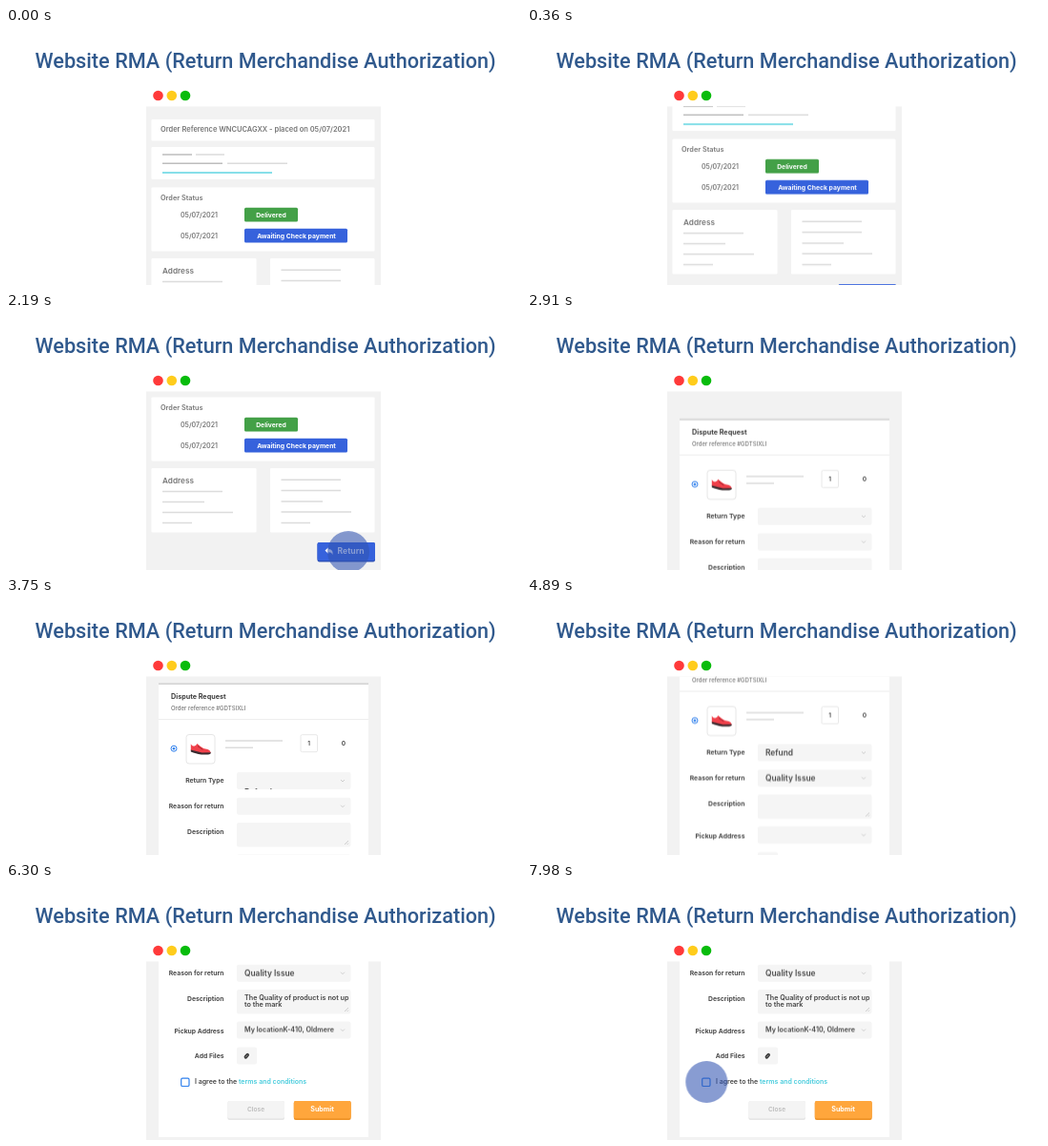
These frames come from a looping animation (540x270 px, 8 s). An HTML page:

```html
<!DOCTYPE html>
<html lang="en">
<head>
<meta charset="utf-8">
<title>Website RMA</title>
<style>
  html, body { margin: 0; width: 100%; height: 100%; overflow: hidden; background: #fff; }
  svg { display: block; }
  text { font-family: Inter, sans-serif; font-weight: 600; font-size: 7px; fill: #777; }
  .title { font-family: Roboto, sans-serif; font-weight: 500; font-size: 21.7px; fill: #30598d; }
  .card { fill: #fff; }
  .line { stroke: #dcdcdc; stroke-width: 1.4; fill: none; }
  .dark { stroke: #bdbdbd; }
  .white { fill: #fff; font-weight: 700; font-size: 6.8px; }
  .label { font-weight: 700; font-size: 6.8px; fill: #4a4a4a; text-anchor: end; }
  .count { font-size: 6.5px; fill: #444; }
  .field { fill: #f5f5f5; }
  .value { font-size: 8.4px; fill: #484848; }
  .note { font-size: 7.2px; fill: #444; }
  .mid { text-anchor: middle; }
  .mark { fill: none; stroke: #c4c4c4; stroke-width: .8; }
  .tap { fill: rgb(50, 85, 178); fill-opacity: .58; }
</style>
</head>
<body>
<svg width="540" height="270" viewBox="0 0 540 270">
  <text class="title" x="30.5" y="42">Website RMA (Return Merchandise Authorization)</text>
  <circle cx="159.5" cy="71" r="5.3" fill="#ff3a3a"/>
  <circle cx="173.8" cy="71" r="5.3" fill="#ffcc1c"/>
  <circle cx="188" cy="71" r="5.3" fill="#08bc0c"/>

  <svg x="147" y="82.5" width="246" height="187.5" viewBox="147 82.5 246 187.5">
    <rect x="147" y="82" width="246" height="188" fill="#f2f2f2"/>

    <g id="order">
      <rect class="card" x="152.5" y="96" width="234" height="22.5" rx="1"/>
      <text x="162" y="109.2" style="font-size:7.48px">Order Reference WNCUCAGXX - placed on 05/07/2021</text>

      <rect class="card" x="152.5" y="125" width="234" height="34" rx="1"/>
      <path class="line dark" d="M164 133H195M164 142.3H227"/>
      <path class="line" d="M199 133H229M232 142.3H295"/>
      <path class="line" style="stroke:#5fd4e2" d="M164 152H279"/>

      <rect class="card" x="152.5" y="167.5" width="234" height="67" rx="1"/>
      <text x="162" y="181.2" style="font-size:7.3px">Order Status</text>
      <text x="183" y="198.7">05/07/2021</text>
      <text x="183" y="220.7">05/07/2021</text>
      <rect x="250" y="188.7" width="56" height="14.8" rx="1.5" fill="#43a047"/>
      <text class="white mid" x="278" y="198.7">Delivered</text>
      <rect x="250" y="210.7" width="108" height="14.8" rx="1.5" fill="#3662dc"/>
      <text class="white mid" x="304.5" y="220.7">Awaiting Check payment</text>

      <rect class="card" x="152.5" y="242" width="110" height="67.5" rx="1"/>
      <rect class="card" x="277" y="242" width="109.5" height="67.5" rx="1"/>
      <text x="164" y="257.5" style="font-size:8.2px">Address</text>
      <path class="line" d="M164 266.5H227M164 277.5H208M164 288.5H238M164 299.5H195"/>
      <path class="line" d="M288.5 254.2H351M288.5 265.5H351M288.5 277H332M288.5 288H362M288.5 299.5H319"/>

      <rect x="326.5" y="320" width="60.5" height="20.5" rx="2" fill="#2c50b8"/>
      <rect x="326.5" y="320" width="60.5" height="19" rx="2" fill="#3662dc"/>
      <path d="M334.5 328.6l3.6-3.3v2c3.4 0 5.2 1.8 4.2 5.6c-.6-2-1.8-2.7-4.2-2.7v1.9z" fill="#fff"/>
      <text class="white" x="347.5" y="332.4" style="font-size:8.6px">Return</text>
    </g>

    <g id="form">
      <rect class="card" x="160" y="90" width="220" height="301"/>
      <rect x="160" y="89.3" width="220" height="1.8" fill="#d6d6d6"/>
      <text x="173" y="106.4" style="font-size:7.2px;font-weight:700;fill:#3c3c3c">Dispute Request</text>
      <text x="173" y="118.4" style="font-size:6px;font-weight:500">Order reference #GDTSIXLI</text>
      <path d="M160 127.5H380" stroke="#eee"/>

      <circle cx="176" cy="158.2" r="3" fill="none" stroke="#2f80ed"/>
      <circle cx="176" cy="158.2" r="1.3" fill="#2f80ed"/>
      <rect x="189" y="143.5" width="30" height="30.5" rx="3" fill="#fff" stroke="#e6e6e6"/>
      <path d="M193.8 153.2c1.5 3 4.5 3.4 6.6-.2c2.6 2.2 4.6 4.2 7.4 5.3c3.6.6 6.4 1.4 7 4.4l-9 .6l-12-3.2z" fill="#f0404a"/>
      <path d="M193.8 159.6l11.8 2.9l9.2-.3c.2 1.4-1 2.2-3 2.2h-7c-4.200-.5-7.500-1.600-11-3z" fill="#3a2a2e"/>
      <path d="M201 155.500l2.600 2.200M203.800 157.300l2.400 2" stroke="#8d1f2b" stroke-width=".8"/>
      <path class="line" d="M230 150H290M230 157.2H259"/>
      <rect x="309" y="143.7" width="17.5" height="18" rx="1.5" fill="#fff" stroke="#e8e8e8"/>
      <text class="count mid" x="317.7" y="154.8">1</text>
      <text class="count mid" x="354" y="154.8">0</text>

      <text class="label" x="228.5" y="193.6">Return Type</text>
      <text class="label" x="228.5" y="220.5">Reason for return</text>
      <text class="label" x="228.5" y="247.5">Description</text>
      <text class="label" x="228.5" y="281.5">Pickup Address</text>
      <text class="label" x="228.5" y="308.2">Add Files</text>

      <rect class="field" x="242" y="183" width="119.5" height="18" rx="2"/>
      <rect class="field" x="242" y="209.7" width="119.5" height="18" rx="2"/>
      <rect class="field" x="242" y="236" width="119.5" height="25.5" rx="2"/>
      <rect class="field" x="242" y="269.5" width="119.5" height="18" rx="2"/>
      <rect class="field" x="242" y="296.5" width="21" height="18" rx="2"/>
      <path class="mark" d="M351 191l2 2l2-2M351 217.7l2 2l2-2M351 277.5l2 2l2-2M355 259l4-4M357.5 259l1.5-1.5"/>
      <g transform="translate(252.3 305.7) rotate(40)">
        <rect x="-1.8" y="-3.2" width="3.6" height="6.4" rx="1.8" fill="#3c3c3c"/>
        <path d="M0 -1.5V1.7" stroke="#aaa" stroke-width=".6"/>
      </g>

      <svg x="242" y="183" width="119" height="18"><text id="type" class="value" x="8" y="12">Refund</text></svg>
      <svg x="242" y="209.7" width="119" height="18"><text id="reason" class="value" x="8" y="12">Quality Issue</text></svg>
      <svg x="242" y="236" width="119" height="25.5">
        <g id="about">
          <text class="note" x="8" y="10.5">The Quality of product is not up</text>
          <text class="note" x="8" y="18.3">to the mark</text>
        </g>
      </svg>
      <svg x="242" y="269.5" width="119" height="18"><text id="place" class="note" x="8" y="11.4">My locationK-410, Oldmere</text></svg>

      <rect x="183.7" y="329.2" width="8.3" height="8.3" rx="1.3" fill="#fff" stroke="#2f80ed" stroke-width="1.2"/>
      <text class="note" x="198" y="335.4" style="font-size:7px">I agree to the <tspan fill="#45cbdc">terms and conditions</tspan></text>

      <rect x="232.3" y="353" width="59.7" height="20" rx="2" fill="#e6e6e6"/>
      <rect x="232.3" y="353" width="59.7" height="18.3" rx="2" fill="#f4f4f4"/>
      <text class="mid" x="262" y="363.9" style="font-size:6.6px;fill:#bbb">Close</text>
      <rect x="301.8" y="353" width="59.9" height="20" rx="2" fill="#ee9226"/>
      <rect x="301.8" y="353" width="59.9" height="18.3" rx="2" fill="#ffa63c"/>
      <text class="white mid" x="331.5" y="364" style="font-size:7.1px">Submit</text>
    </g>

    <g transform="translate(359 251)"><circle id="tapReturn" class="tap" r="22"/></g>
    <g transform="translate(188.3 209)"><circle id="tapAgree" class="tap" r="22"/></g>
  </svg>
</svg>
<script>
  const LOOP = 8000;
  const GLIDE = 'cubic-bezier(.2,.35,.2,1)';
  const SOFT = 'cubic-bezier(.3,.2,.4,1)';

  // steps: [time in ms, style, easing towards the next step]
  function play(id, steps) {
    const all = [[0, steps[0][1]], ...steps, [LOOP, steps[steps.length - 1][1]]];
    const frames = all.map(([t, style, easing = 'linear']) => ({ offset: t / LOOP, easing, ...style }));
    document.getElementById(id).animate(frames, { duration: LOOP, iterations: Infinity });
  }

  const shift = (y, opacity = 1) => ({ transform: `translateY(${y}px)`, opacity });
  const size = (s, opacity = 1) => ({ transform: `scale(${s})`, opacity });
  const rise = (id, from, to, y) => play(id, [[from, shift(y), SOFT], [to, shift(0)]]);

  play('order', [
    [30, shift(0), GLIDE],
    [1200, shift(-79)],
    [2400, shift(-79)],
    [2900, shift(-79, 0)]
  ]);
  play('form', [
    [2340, shift(182), GLIDE],
    [3450, shift(0)],
    [4785, shift(0), GLIDE],
    [5805, shift(-124)]
  ]);

  rise('type', 3730, 3970, 13);
  rise('reason', 3900, 4170, 13);
  rise('about', 5600, 5960, 24);
  rise('place', 5930, 6295, 14);

  play('tapReturn', [
    [1950, size(0), 'ease-out'],
    [2180, size(1)],
    [2220, size(1)],
    [2430, size(1, 0)]
  ]);
  play('tapAgree', [
    [7740, size(0), 'ease-out'],
    [7970, size(1)]
  ]);
</script>
</body>
</html>
```
